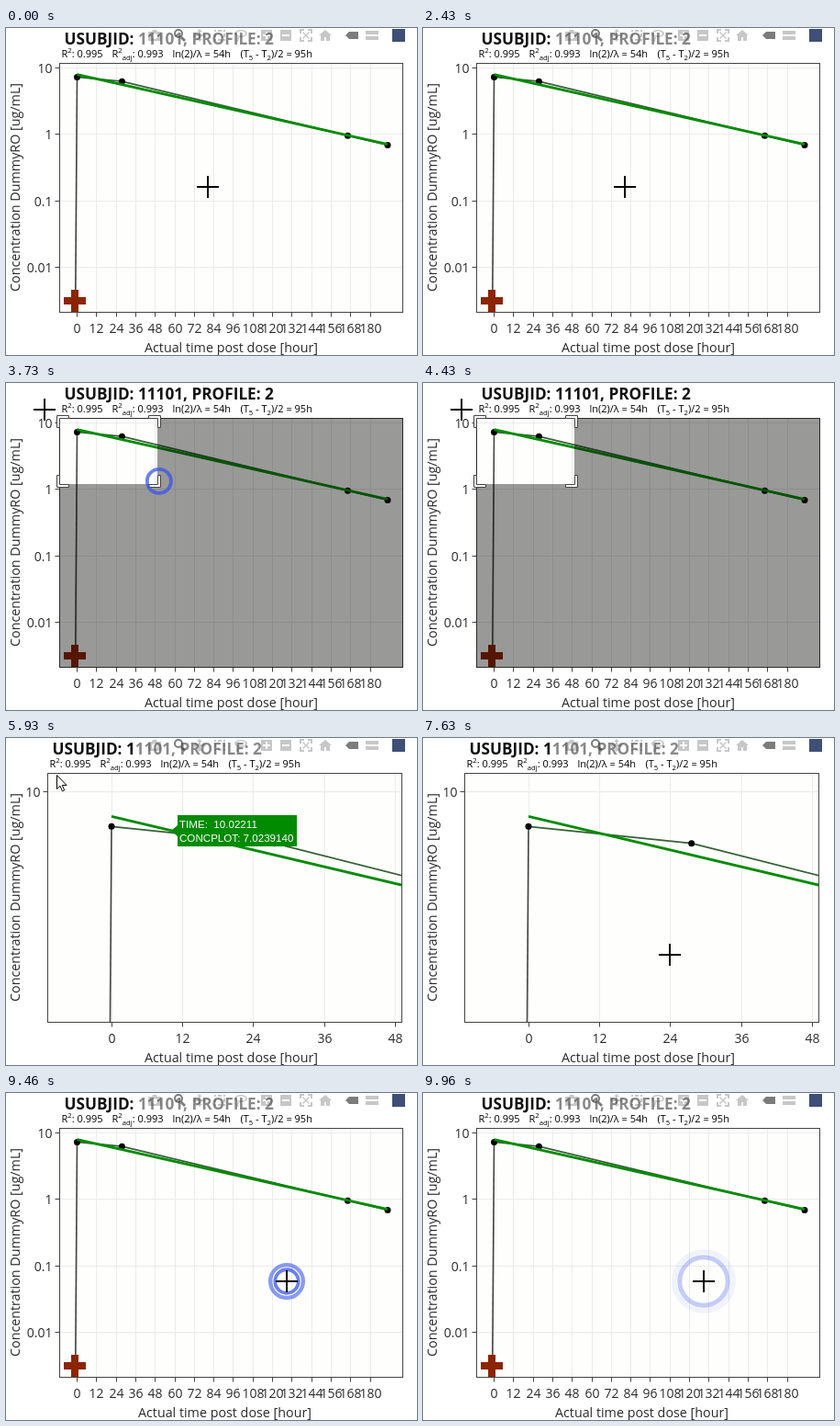
Animation, 448 px wide and 356 px high, one loop 10 s. Source, as an HTML page with a canvas:

```html
<!DOCTYPE html>
<html lang="en">
<head>
<meta charset="utf-8">
<style>
html, body { margin: 0; width: 100%; height: 100%; overflow: hidden; background: #fff; }
canvas { display: block; }
</style>
</head>
<body>
<canvas id="stage" width="448" height="356"></canvas>
<script>
const ctx = document.getElementById('stage').getContext('2d', { alpha: false });
const LOOP = 10000, ZOOM_IN = 5660, ZOOM_OUT = 9060;
const TOP = 38.5, BOTTOM = 309.5;
const PRESS = [165, 110], CORNER = [42, 29], CLICK = [306, 205];
const GREEN = '#008b00', INK = '#444', TEXT = '#2a2a2a';
const SANS = '"Open Sans", "Noto Sans", sans-serif';

const clamp = v => Math.max(0, Math.min(1, v));
const part = (t, a, b) => clamp((t - a) / (b - a));
const ease = p => p * p * (3 - 2 * p);
const mix = (a, b, p) => a + (b - a) * p;

function text(s, x, y, size, align = 'left', color = TEXT, family = SANS) {
  ctx.font = size + 'px ' + family;
  ctx.textAlign = align;
  ctx.fillStyle = color;
  ctx.fillText(s, x, y);
}

function line(points, color, width) {
  ctx.beginPath();
  points.forEach(p => ctx.lineTo(p[0], p[1]));
  ctx.strokeStyle = color;
  ctx.lineWidth = width;
  ctx.stroke();
}

// ^ starts a superscript, _ a subscript, | returns to normal
function richText(s, x, y) {
  for (const run of s.match(/[\^_|]?[^\^_|]+/g)) {
    const mode = run[0], small = mode === '^' || mode === '_';
    const str = run.replace(/^[\^_|]/, '');
    text(str, x, y + (mode === '^' ? -5 : mode === '_' ? 3 : 0), small ? 7.7 : 11, 'left', '#000');
    x += ctx.measureText(str).width;
  }
}

// Chart coordinates are those of the full view; zooming rescales them
function drawChart(zoomed, titleX) {
  const left = zoomed ? 45.5 : 58.5, right = zoomed ? 431.5 : 432.5;
  const map = ([x, y]) => zoomed ? [115 + (x - 77.5) * 3.634, 58.5 + (y - 43.5) * 3.82] : [x, y];
  const hourX = h => map([77.5 + h * 1.775, 0])[0];
  const snap = v => Math.floor(v) + 0.5;

  ctx.fillStyle = '#fefffd';
  ctx.fillRect(left, TOP, right - left, BOTTOM - TOP);
  for (let h = 0; h <= (zoomed ? 48 : 180); h += 12) {
    const x = snap(hourX(h));
    line([[x, TOP], [x, BOTTOM]], '#ebebeb', 1);
    line([[x, BOTTOM], [x, BOTTOM + 5]], INK, 1);
    text(h, x, 332, 14, 'center');
  }
  (zoomed ? ['10'] : ['10', '1', '0.1', '0.01']).forEach((label, i) => {
    const y = snap(map([0, 43.5 + i * 72.3])[1]);
    line([[left, y], [right, y]], '#ebebeb', 1);
    line([[left - 5, y], [left, y]], INK, 1);
    text(label, left - 8, y + 5, 14, 'right');
  });

  ctx.save();
  ctx.beginPath();
  ctx.rect(left, TOP, right - left, BOTTOM - TOP);
  ctx.clip();
  const blq = map([75.7, 297]);
  const pts = [[77.5, 53.4], [126.4, 58.2], [372.5, 117.2], [416, 127.5]].map(map);
  line([blq, pts[0]], INK, 1.6);
  line(pts, '#356135', 1.7);
  ctx.fillStyle = '#000';
  for (const [x, y] of pts) {
    ctx.beginPath();
    ctx.arc(x, y, 3.5, 0, 7);
    ctx.fill();
  }
  line([map([77.5, 50.55]), map([416, 126.6])], GREEN, 2.8);
  if (!zoomed) {
    ctx.fillStyle = '#8b2500';
    ctx.fillRect(63, 293, 24, 8);
    ctx.fillRect(71, 285, 8, 24);
  }
  ctx.restore();
  ctx.strokeStyle = INK;
  ctx.lineWidth = 1;
  ctx.strokeRect(left, TOP, right - left, BOTTOM - TOP);

  text('USUBJID: 11101, PROFILE: 2', left + 5, 18, 'bold 17.2', 'left', '#111');
  richText('R^2|: 0.995', left + 2, 32);
  richText('R^2_adj|: 0.993', left + 57, 32);
  richText('ln(2)/λ = 54h', left + 123, 32);
  richText('(T_5| - T_2|)/2 = 95h', left + 197, 32);
  text('Actual time post dose [hour]', titleX, 353, 14.3, 'center');
  ctx.save();
  ctx.translate(15, 173.5);
  ctx.rotate(-Math.PI / 2);
  text('Concentration DummyRO [ug/mL]', 0, 0, 14.3, 'center');
  ctx.restore();
}

// x centre, outline, active
const icons = [
  [162, 'M-7-4h4l1-2h4l1 2h4v10h-14zM3 1a3 3 0 1 0-6 0a3 3 0 1 0 6 0z'],
  [189, 'M4-2a5 5 0 1 0-10 0a5 5 0 1 0 10 0zM2-2a3 3 0 1 0-6 0a3 3 0 1 0 6 0zM3 1l4 4-2 2-4-4z', true],
  [211, 'M0-7l3 3h-2v3h3v-2l3 3-3 3v-2h-3v3h2l-3 3-3-3h2v-3h-3v2l-3-3 3-3v2h3v-3h-2z'],
  [233, 'M-6-6h2v2h-2zM-2-6h4v2h-4zM4-6h2v2h-2zM-6-2h2v4h-2zM4-2h2v4h-2zM-6 4h2v2h-2zM-2 4h4v2h-4zM4 4h2v2h-2z'],
  [256, 'M7-2a7 4 0 1 0-14 0a7 4 0 1 0 14 0zM5-2a5 2.5 0 1 0-10 0a5 2.5 0 1 0 10 0zM-4 2h2l-1 5h-2z'],
  [284, 'M-6-6h12v12h-12zM-1-4v3h-3v2h3v3h2v-3h3v-2h-3v-3z'],
  [305, 'M-6-6h12v12h-12zM-4-1h8v2h-8z'],
  [327, 'M-7-7h5v2h-3v3h-2zM7-7h-5v2h3v3h2zM-7 7h5v-2h-3v-3h-2zM7 7h-5v-2h3v-3h2zM0-1l3-3 1 1-3 3 3 3-1 1-3-3-3 3-1-1 3-3-3-3 1-1z'],
  [348, 'M0-6l7 6h-2v6h-4v-4h-2v4h-4v-6h-2z'],
  [377, 'M-7 0l4-4h10v8h-10z', true],
  [399, 'M-7-5h14v4h-14zM-7 1h14v4h-14z']
].map(([x, d, on]) => [x, new Path2D(d), on]);

function drawToolbar(alpha) {
  if (!alpha) return;
  ctx.save();
  ctx.globalAlpha = alpha;
  ctx.fillStyle = 'rgba(255,255,255,.5)';
  ctx.fillRect(142, 0, 294, 20);
  for (const [x, path, on] of icons) {
    ctx.save();
    ctx.translate(x, 8);
    ctx.fillStyle = `rgba(68,68,68,${on ? 0.7 : 0.3})`;
    ctx.fill(path, 'evenodd');
    ctx.restore();
  }
  ctx.fillStyle = '#3f4f75';
  ctx.fillRect(421, 1, 14, 14);
  ctx.restore();
}

function drawSelection(t, [cx, cy]) {
  const fade = part(t, 3300, 3500);
  const l = Math.max(Math.round(cx), 59), top = Math.max(Math.round(cy), 39), [r, b] = PRESS;
  ctx.beginPath();
  ctx.rect(58, 38, 375, 272);
  ctx.rect(l, top, r - l, b - top);
  ctx.fillStyle = `rgba(0,0,0,${0.4 * fade})`;
  ctx.fill('evenodd');

  const n = Math.floor(Math.min(b - top, r - l, 20) / 2);
  ctx.save();
  ctx.globalAlpha = fade;
  ctx.fillStyle = '#fff';
  ctx.strokeStyle = INK;
  ctx.lineWidth = 1;
  for (const [x, y, sx, sy] of [[l, top, 1, 1], [r, top, -1, 1], [r, b, -1, -1], [l, b, 1, -1]]) {
    ctx.beginPath();
    for (const [u, v] of [[-3, n], [0, n], [0, 0], [n, 0], [n, -3], [-3, -3]])
      ctx.lineTo(x + (u - 0.5) * sx, y + (v - 0.5) * sy);
    ctx.closePath();
    ctx.fill();
    ctx.stroke();
  }
  ctx.restore();
}

function drawRipple(age, x, y) {
  if (age <= 0 || age >= 1270) return;
  ctx.beginPath();
  ctx.arc(x, y, 0.0205 * age + 4e-6 * age * age, 0, 7);
  ctx.lineWidth = 2.4 + 0.0025 * age;
  ctx.strokeStyle = `rgba(56,84,232,${1 - (age / 1320) ** 1.6})`;
  ctx.stroke();
}

function drawTooltip() {
  ctx.beginPath();
  for (const p of [[180, 101], [187, 95], [187, 84], [317, 84], [317, 118], [187, 118], [187, 107]])
    ctx.lineTo(...p);
  ctx.closePath();
  ctx.fillStyle = GREEN;
  ctx.fill();
  const family = '"Liberation Sans", Arial, sans-serif';
  text('TIME:\u00a0 10.02211', 189, 98, 11.6, 'left', '#fff', family);
  text('CONCPLOT: 7.0239140', 189, 113, 11.6, 'left', '#fff', family);
}

// Each move: start, end, target, vertical lag
const moves = [
  [2400, 3000, PRESS, 1],
  [3250, 3585, CORNER, 1.6],
  [5883, 6160, [200, 165], 1],
  [6330, 6600, [269, 236], 1],
  [8230, 8400, CLICK, 1]
];

function cursorAt(t) {
  let pos = [220, 173];
  for (const [a, b, to, lag] of moves) {
    const p = ease(part(t, a, b));
    pos = [mix(pos[0], to[0], p), mix(pos[1], to[1], p ** lag)];
  }
  return pos;
}

const arrow = new Path2D('M.5 .5v15l3.5-3.3 2.4 5.6 2.3-1-2.4-5.4h4.7z');

function drawCursor(t, [x, y]) {
  x = Math.round(x);
  y = Math.round(y);
  if (t >= ZOOM_IN && t < 6000) {
    ctx.save();
    ctx.translate(x, y);
    ctx.fillStyle = '#fff';
    ctx.strokeStyle = '#000';
    ctx.lineWidth = 1;
    ctx.fill(arrow);
    ctx.stroke(arrow);
    ctx.restore();
    return;
  }
  line([[x - 12, y], [x + 12, y]], '#000', 2);
  line([[x, y - 12], [x, y + 12]], '#000', 2);
}

function draw(t) {
  const cursor = cursorAt(t);
  ctx.fillStyle = '#fff';
  ctx.fillRect(0, 0, 448, 356);
  drawChart(t >= ZOOM_IN && t < ZOOM_OUT, t < ZOOM_OUT ? 245.5 : 238.5);
  drawToolbar(t < ZOOM_IN ? 1 - part(t, 3160, 3360) : part(t, ZOOM_IN, 5860));
  if (t > 3300 && t < ZOOM_IN) drawSelection(t, cursor);
  if (t >= 5700 && t < 6330) drawTooltip();
  const drift = part(t, 3400, 4200);
  drawRipple(t - 3160, PRESS[0] + 4.5 * drift, PRESS[1] - 7.5 * drift);
  drawRipple(t - 8700, ...CLICK);
  drawRipple(t - 8900, ...CLICK);
  drawCursor(t, cursor);
}

const start = performance.now();
function tick() {
  draw((performance.now() - start) % LOOP);
  requestAnimationFrame(tick);
}
tick();
</script>
</body>
</html>
```
